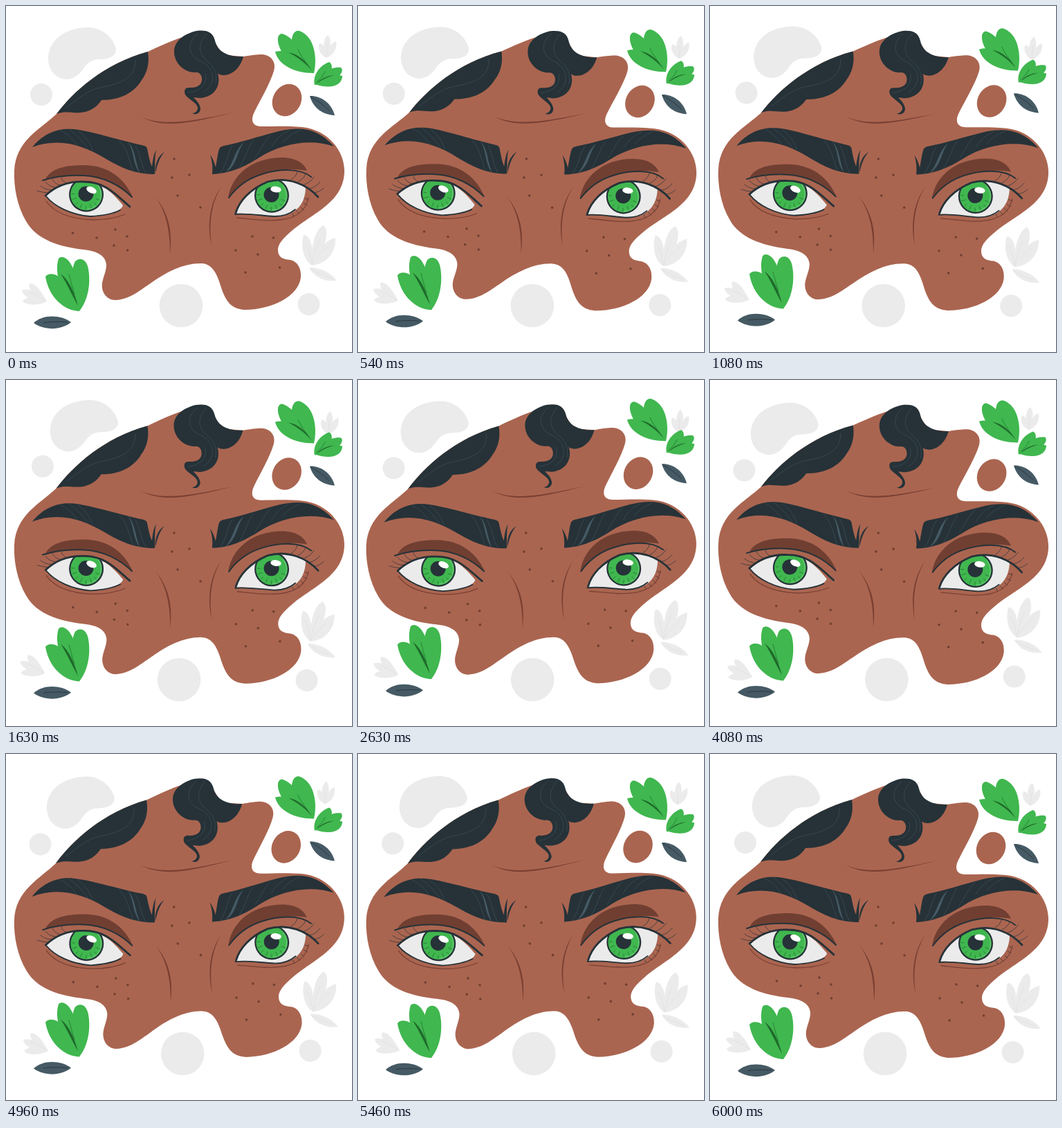
An HTML page with a canvas that plays this animation: 500x500 px, repeating every 6.04 s.

```html
<!DOCTYPE html>
<html lang="en">
<head>
<meta charset="utf-8">
<title>Gaze</title>
<style>
html, body { margin: 0; width: 100%; height: 100%; overflow: hidden; background: #fff; }
canvas { display: block; width: 100vw; height: 100vh; }
</style>
</head>
<body>
<canvas id="stage"></canvas>
<script>
const SIZE = 500, LOOP = 6040, FPS = 24, TURN = Math.PI * 2;
const SKIN = '#aa6550', SHADE = '#703f32', CREASE = '#7a4033', DARK = '#263238',
  SLATE = '#455a64', STRAND = '#3b4c55', GREEN = '#40b74f', VEIN = '#1e6a2b', PALE = '#ebebeb', PALE_VEIN = '#e0e0e0';

const canvas = document.getElementById('stage');
const ctx = canvas.getContext('2d');

function fit() {
  const dpr = window.devicePixelRatio || 1;
  canvas.width = Math.round(innerWidth * dpr);
  canvas.height = Math.round(innerHeight * dpr);
}
addEventListener('resize', fit);
fit();

const cache = new Map();
function path(d) {
  if (!cache.has(d)) cache.set(d, new Path2D(d));
  return cache.get(d);
}
function fill(color, ...shapes) {
  ctx.fillStyle = color;
  shapes.forEach(d => ctx.fill(path(d)));
}
function line(color, width, ...shapes) {
  ctx.strokeStyle = color;
  ctx.lineWidth = width;
  shapes.forEach(d => ctx.stroke(path(d)));
}
function oval(color, x, y, rx, ry = rx, turn = 0) {
  ctx.fillStyle = color;
  ctx.beginPath();
  ctx.ellipse(x, y, rx, ry, turn, 0, TURN);
  ctx.fill();
}

const FACE = 'M73 156C97 124 142 83 205 66C222 58 240 50 252 46L287 36C300 40 305 66 318 71L343 73C355 71 362 70 370 70' +
  'C384 71 391 82 387 94C382 111 368 135 359 153C353 165 356 174 369 174C390 174 407 173 428 175C466 179 489 210 489 238' +
  'C489 283 444 299 414 324C401 335 392 344 393 354C394 364 401 366 411 367C421 369 427 379 426 392C423 420 383 439 345 439' +
  'C325 438 318 426 312 410C306 390 300 373 283 372C258 371 233 383 207 402C192 412 178 424 158 425C146 425 137 414 139 400' +
  'C141 390 145 383 145 374C144 361 132 354 112 352C78 348 44 338 29 311C16 289 11 261 12 238C14 194 50 178 73 156Z';
const HAIR = 'M73 156C97 124 142 83 205 66C208 84 203 98 196 107C186 124 167 136 138 136C132 145 122 153 108 154C94 155 86 151 73 156Z';
const CURL = 'M275 36C291 34 299 38 302 50C306 68 324 74 343 73C339 88 329 99 315 100C311 100 307 99 306 97C311 115 302 131 281 133' +
  'C277 133 273 132 271 132C276 137 281 143 281 149C280 155 275 158 269 155C275 155 279 149 276 144C273 139 262 133 259 128' +
  'C257 123 258 118 264 118C279 119 284 112 283 104C282 98 278 95 273 96C258 96 243 83 243 66C243 50 258 40 275 36Z';
const BROW_L = 'M38 204C55 183 76 176 98 178C120 180 160 193 196 201C201 202 203 203 204 206C206 216 208 226 211 232C212 224 213 215 217 208' +
  'C214 222 216 233 215 243C185 243 165 233 143 220C110 200 75 190 38 204Z';
const BROW_R = 'M474 203C450 176 425 174 394 181C363 189 340 197 315 202C311 203 309 204 308 207C306 213 305 222 303 233C301 225 298 219 295 215' +
  'C298 224 299 234 298 243C328 242 350 229 366 219C398 199 440 191 474 203Z';
const EYE_L = 'M58 275C72 260 92 253 113 254C140 255 155 271 169 288C167 296 150 303 122 304C95 302 70 290 58 275Z';
const EYE_R = 'M332 300C337 282 352 265 378 254C398 249 420 253 433 261C433 285 420 303 390 304C368 303 350 299 332 300Z';

const FRECKLES = [[243, 221], [240, 248], [265, 244], [248, 274], [281, 291], [96.5, 328], [131, 335], [158, 323], [175, 333],
  [156, 346], [175.5, 353], [356, 333], [386.5, 335], [332, 353], [364, 359], [395.5, 378], [346, 385]];

function iris(eye, x, y, shineX, shineY, tilt) {
  ctx.save();
  ctx.clip(path(eye));
  oval(DARK, x, y, 25);
  oval(GREEN, x, y, 22.8);
  ctx.strokeStyle = '#8fd698';
  ctx.lineWidth = 0.7;
  ctx.beginPath();
  ctx.arc(x, y, 21.4, -0.7, 1.5);
  ctx.stroke();
  ctx.strokeStyle = VEIN;
  for (let i = 0; i < 8; i++) {
    const a = 0.4 + i * 0.4, r = 15 + (i % 2) * 2;
    ctx.beginPath();
    ctx.moveTo(x + r * Math.cos(a), y + r * Math.sin(a));
    ctx.lineTo(x + 21 * Math.cos(a), y + 21 * Math.sin(a));
    ctx.stroke();
  }
  ctx.restore();
  oval(DARK, x - 0.5, y - 1, 11);
  oval('#fff', shineX, shineY, 7.8, 4.4, tilt);
}

function leftEye() {
  fill(SHADE, 'M57 250C66 233 90 230 112 230C150 230 172 251 183 276C165 259 140 246 112 245C90 244 72 247 57 250Z');
  line(DARK, 2, 'M53 252C72 246 92 244 112 245C140 246 165 259 182 276');
  fill(PALE, EYE_L);
  iris(EYE_L, 116, 272.5, 123.5, 266, 0.42);
  line(DARK, 1.8, 'M58 275C70 290 95 302 122 304C140 303 155 300 165 295');
  line(DARK, 2.8, 'M57 274C72 260 92 253 113 254C144 254 159 273 179 290');
  line(DARK, 0.7, 'M45 267Q54 270 61 270', 'M50 260Q57 266 66 266', 'M57 254Q62 261 71 262', 'M67 250Q70 257 78 259', 'M80 248Q81 253 87 256');
  line(CREASE, 1.3, 'M58 282C72 302 100 308 125 309C145 309 160 306 172 301');
}

function rightEye() {
  fill(SHADE, 'M321 278C325 246 354 219 399 219C420 219 431 228 435 238C415 234 390 237 370 243C350 249 333 262 321 278Z');
  line(DARK, 2, 'M322 277C333 262 350 249 370 243C392 236 424 233 441 247');
  fill(PALE, EYE_R);
  iris(EYE_R, 384, 273.7, 390, 265, 0.12);
  line(DARK, 1.8, 'M331 301C350 299 368 303 388 304C402 304 411 300 418 294');
  line(DARK, 2.8, 'M332 299C337 282 352 265 378 254C408 246 435 258 451 276');
  line(DARK, 0.7, 'M412 251Q419 247 421 240', 'M422 254Q430 250 433 243', 'M431 258Q440 255 445 247', 'M439 264Q448 262 454 254', 'M445 270Q453 269 459 263',
    'M432 278L437 280', 'M430 285L435 288', 'M426 291L430 295', 'M420 296L424 300', 'M414 300L416 304');
  line(CREASE, 1.3, 'M334 306C365 309 380 311 397 309C421 306 434 294 437 277');
}

function face() {
  fill(SKIN, FACE);
  oval(SKIN, 406, 136, 20.3, 24.2, 0.52);
  fill(DARK, HAIR, CURL);
  line(STRAND, 0.8, 'M187 78C188 104 166 112 140 117C120 121 112 128 88 146', 'M277 40C261 52 262 72 282 80C303 90 304 114 286 124',
    'M290 40C277 54 277 68 291 80C302 88 306 100 303 112', 'M288 98C292 112 281 124 263 125');
  fill(CREASE, 'M195 160C228 178 268 169 329 154C268 166.5 228 174.5 195 160Z',
    'M216 276C235 300 241 325 237 358C237 325 232 299 216 276Z',
    'M311 261C294 290 294 320 297 346C291 320 292 288 311 261Z');

  fill(DARK, BROW_L, BROW_R, 'M229 211C220 216 215 228 216 241C219 228 222 219 229 211Z');
  line(STRAND, 0.8, 'M79 180C92 186 97 194 103 201', 'M92 179C104 187 111 197 119 206', 'M105 181C115 188 120 196 125 208',
    'M164 195C176 207 178 224 184 239', 'M187 202C195 214 194 230 202 241',
    'M327 202C318 216 320 229 309 242', 'M357 194C348 207 347 219 337 234', 'M383 186C371 197 369 208 360 219',
    'M409 180C396 186 389 194 384 203', 'M426 179C412 185 405 191 400 197');
  fill(SLATE, 'M176 196C188 208 186 225 194 242C182 228 186 210 176 196Z', 'M344 197C333 210 335 230 317 241C330 227 329 209 344 197Z');

  leftEye();
  rightEye();
  FRECKLES.forEach(([x, y]) => oval(SHADE, x, y, 1.8));
}

function leaves() {
  fill(GREEN,
    'M445 97C450 78 447 44 424 36C415 34 411 47 414 59C417 75 430 88 445 97Z',
    'M445 97C427 68 417 45 399 40C390 40 391 57 402 71C412 83 428 92 445 97Z',
    'M445 97C428 73 408 61 389 66C393 84 415 97 445 97Z',
    'M446 114C443 100 453 86 467 81C473 84 472 95 464 102C458 108 452 112 446 114Z',
    'M446 114C454 98 469 87 484 89C488 92 485 100 475 106C465 111 455 113 446 114Z',
    'M446 113C455 103 472 97 486 101C486 112 474 122 446 113Z',
    'M105 441C85 440 62 422 57 391C62 384 76 386 88 402C98 414 103 428 105 441Z',
    'M105 441C80 420 69 386 76 365C81 359 92 365 98 382C104 400 107 420 105 441Z',
    'M105 441C95 420 92 383 100 369C107 362 117 366 119 380C123 402 118 426 106 441Z');
  fill(VEIN, 'M408 67C422 69 434 80 442 93C432 82 422 74 408 67Z', 'M474 100C463 101 455 105 449 112C456 107 463 103 474 100Z',
    'M79 387C91 396 99 414 104 433C95 418 89 402 79 387Z');
  line(VEIN, 0.7, 'M436 85C430 77 425 70 422 63', 'M449 110C455 105 458 101 461 95', 'M99 416C95 404 93 395 91 388');
  fill(SLATE, 'M439 130C452 129 470 138 475 158C458 157 444 148 439 130Z', 'M40 458C52 446 78 445 94 457C80 469 55 469 40 458Z');
  line(DARK, 0.8, 'M440 131C451 137 459 143 467 151', 'M55 457.5C65 456 77 456 89 457');
}

function backdrop() {
  fill(PALE,
    'M61 78C60 50 85 31 120 31C140 32 155 46 159 62C159 74 147 77 135 77C122 77 116 84 110 93C103 102 95 106 87 106C72 105 62 93 61 78Z',
    'M463 75C453 70 450 60 453 54C459 53 463 65 463 75Z',
    'M463 75C456 62 459 46 465 42C471 46 470 64 463 75Z',
    'M463 75C465 62 470 53 477 51C479 60 475 70 463 75Z',
    'M59 427C50 410 42 400 34 401C30 408 42 422 59 427Z',
    'M59 427C48 412 30 407 23 411C25 420 40 428 59 427Z',
    'M59 427C45 418 30 419 24 427C30 433 48 433 59 427Z',
    'M442 375C428 365 426 345 430 331C440 330 446 352 442 375Z',
    'M442 375C440 350 446 322 459 317C468 325 462 352 442 375Z',
    'M442 375C450 350 463 338 476 335C477 355 465 372 442 375Z',
    'M438 378C452 377 470 385 478 397C462 399 446 393 438 378Z');
  line(PALE_VEIN, 0.8, 'M442 373C444 360 449 348 453 338', 'M442 373C449 362 458 353 465 348', 'M441 370C440 360 437 351 434 345',
    'M440 380C451 386 460 391 470 393', 'M463 73L464 56', 'M57 426C48 420 41 416 34 414');
  oval(PALE, 51, 128, 16);
  oval(PALE, 253, 433, 31.3);
  oval(PALE, 437.5, 431, 16);
}

// Triangle wave: 0, 1 at a quarter, -1 at three quarters, 0.
function swing(p) {
  p %= 1;
  return p < 0.25 ? p * 4 : p < 0.75 ? 2 - p * 4 : p * 4 - 4;
}

function sway(degrees, draw) {
  ctx.save();
  ctx.translate(250, 250);
  ctx.rotate(degrees * Math.PI / 180);
  ctx.translate(-250, -250);
  draw();
  ctx.restore();
}

function render(ms) {
  const sec = Math.floor(ms * FPS / 1000 + 0.2) / FPS;
  const scale = Math.min(canvas.width, canvas.height) / SIZE;
  ctx.setTransform(1, 0, 0, 1, 0, 0);
  ctx.fillStyle = '#fff';
  ctx.fillRect(0, 0, canvas.width, canvas.height);
  ctx.setTransform(scale, 0, 0, scale, 0, 0);
  ctx.lineCap = 'round';

  sway(swing(sec / 6), backdrop);
  sway(swing(sec / 3), face);

  const p = sec / 6 % 1;
  ctx.save();
  ctx.translate(0, -10 * (1 - Math.abs(1 - 2 * p)));
  leaves();
  ctx.restore();
}

const start = performance.now();
function tick() {
  render((performance.now() - start) % LOOP);
  requestAnimationFrame(tick);
}
tick();
</script>
</body>
</html>
```
